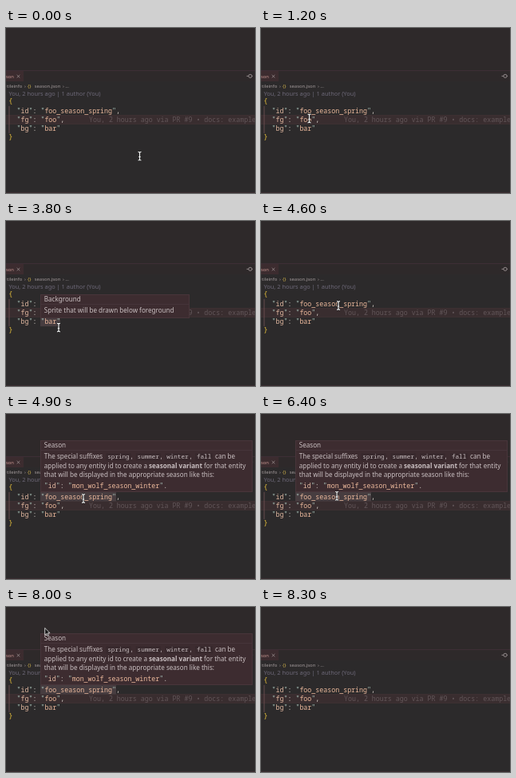
An HTML page for the animation above (9.1 s loop, 312x207 px).

```html
<!DOCTYPE html>
<html lang="en">
<head>
<meta charset="utf-8">
<title>Hover help in a JSON editor</title>
<style>
html, body { margin: 0; width: 100%; height: 100%; overflow: hidden; background: #2c2a2b; }
svg { display: block; width: 312px; height: 207px; }
text { font: 8.1px "Noto Sans", sans-serif; fill: #c9bfc1; white-space: pre; }
.small { font-size: 5.9px; fill: #a39a9b; }
.code { font: 500 8.3px "Noto Sans Mono", monospace; fill: #d3cbc5; }
.chip { font: 7.6px "Noto Sans Mono", monospace; }
.brace { fill: #ecc53c; font-size: 8.8px; }
.key { fill: #e2b8a0; }
.str { fill: #ecb99c; }
.quote { fill: #a9c2b8; }
.lens { fill: #6d6878; font-size: 7.4px; }
.blame { fill: #625659; font-weight: 400; }
.bold { font-weight: 700; }
.box { fill: #3d2c30; stroke: #48353a; }
.rule { stroke: #45343a; }
</style>
</head>
<body>
<svg viewBox="0 0 312 207">
  <rect width="312" height="207" fill="#2c2a2b"/>
  <rect width="312" height="67" fill="#2e292a"/>
  <rect y="54" width="22" height="13" fill="#3c2c2f"/>
  <path d="M0 53.5H312" stroke="#43303a" stroke-opacity=".8"/>
  <text class="small" x="10" y="63" text-anchor="end" style="fill:#c4938e">season.json</text>
  <path d="M13.7 58.8l3.6 3.6m0-3.6l-3.6 3.6" stroke="#a89c9e" stroke-width=".7"/>
  <g fill="none" stroke="#aaa0a1" stroke-width=".8">
    <circle cx="306" cy="60.3" r="2.1"/><path d="M301.5 60.3h2.4m4.2 0h1"/>
  </g>
  <text class="small" x="1" y="74.5">tileinfo</text>
  <text class="small" x="23" y="74.5">›</text>
  <text class="small" x="27" y="74.5" style="fill:#d9b84c">{}</text>
  <text class="small" x="35.7" y="74.5">season.json</text>
  <text class="small" x="71" y="74.5">› …</text>
  <text class="lens" x="3.5" y="84.8">You, 2 hours ago | 1 author (You)</text>
  <rect y="109" width="312" height="12" fill="#392d2f"/>
  <path d="M0 109.5H312M0 120.5H312" stroke="#403335" stroke-width=".6"/>
  <path d="M4 98V132" stroke="#745456" stroke-width=".8"/>
  <path d="M0 206.5H312" stroke="#3a2d30"/>
  <rect id="mark" x="43" height="11.5" fill="#473d40"/>
  <g id="lines"></g>
  <g id="popup"></g>
  <g id="beam" fill="none">
    <path id="stem" d="M-2-5.3Q0-5.3 0-4V4Q0 5.3-2 5.3M2-5.3Q0-5.3 0-4M0 4Q0 5.3 2 5.3M-1.2 1H1.2"
      stroke="#171717" stroke-width="2.4"/>
    <path d="M-2-5.3Q0-5.3 0-4V4Q0 5.3-2 5.3M2-5.3Q0-5.3 0-4M0 4Q0 5.3 2 5.3M-1.2 1H1.2"
      stroke="#f2f2f2" stroke-width="1.2"/>
  </g>
  <path id="arrow" d="M.4.4V9.2L2.5 7.4L3.9 10.6L5.4 9.9L4 6.8H6.8Z" fill="#161616" stroke="#f2f2f2" stroke-width=".8"/>
</svg>
<script>
const $ = id => document.getElementById(id);
const text = (cls, x, y, s) => `<text class="${cls}" x="${x}" y="${y}">${s}</text>`;
const span = (cls, s) => `<tspan class="${cls}">${s}</tspan>`;
const quoted = (cls, s) => span('quote', '"') + span(cls, s) + span('quote', '"');
const pair = (x, y, key, value, end) =>
  text('code', x, y, `${quoted('key', key)}: ${quoted('str', value)}${end}`);

$('lines').innerHTML =
  text('code brace', 3.3, 95, '{') +
  pair(13.5, 106.6, 'id', 'foo_season_spring', ',') +
  pair(13.5, 117.6, 'fg', 'foo', ',') +
  pair(13.5, 129, 'bg', 'bar', '') +
  text('code brace', 3.3, 139.8, '}') +
  text('code blame', 104, 117.6, 'You, 2 hours ago via PR #9 • docs: example');

const left = 47.8;
const frame = (y, w, h, title) =>
  `<rect class="box" x="43.5" y="${y + .5}" width="${w - 1}" height="${h - 1}"/>` +
  `<path class="rule" d="M44 ${y + 12.5}h${w - 2}"/>` + text('', left, y + 9, title);
const note = (y, w, title, body) => frame(y, w, 30, title) + text('', left, y + 23, body);
const chip = (x, s) =>
  `<rect x="${x - 2}" y="49" width="${s.length * 4.56 + 4}" height="9.5" rx="1.5" fill="#38292d"/>` +
  text('chip', x, 56.3, s);

const season = frame(33, 266, 65, 'Season') +
  text('', left, 56.4, 'The special suffixes') +
  chip(127.3, 'spring') + text('', 156.5, 56.4, ',') +
  chip(164.6, 'summer') + text('', 193.5, 56.4, ',') +
  chip(201.2, 'winter') + text('', 230.5, 56.4, ',') +
  chip(239, 'fall') + text('', 262, 56.4, 'can be') +
  text('', left, 67.8, `applied to any entity id to create a ${span('bold', 'seasonal variant')} for that entity`) +
  text('', left, 78.8, 'that will be displayed in the appropriate season like this:') +
  pair(left, 92.8, 'id', 'mon_wolf_season_winter', '.');

// Each hover: highlight start, popup start, end, highlight y and width, popup
const hovers = [
  [1600, 1700, 2300, 109.3, 25, note(79, 54, 'Foreground', 'Main sprite')],
  [2700, 2800, 3900, 120.7, 25, note(92, 187, 'Background', 'Sprite that will be drawn below foreground')],
  [4800, 4900, 8200, 98, 95, season]
];

// Pointer stops: time, x, y
const stops = [
  [0, 167.5, 160.7], [300, 167.5, 160.7], [900, 39, 118], [1100, 39, 118],
  [1200, 60.5, 113.5], [2100, 60.5, 113.5], [2400, 54, 122.5], [3600, 54, 122.5],
  [4100, 88, 154], [4600, 97, 106], [6300, 97, 106], [7000, 62, 48],
  [7300, 62, 48], [7400, 61.5, 47.6], [7800, 61.5, 47.6], [8300, 24, -14], [9100, 24, -14]
];

function pointer(t) {
  const i = stops.findIndex(s => s[0] > t);
  const [t0, x0, y0] = stops[i - 1], [t1, x1, y1] = stops[i];
  const u = (t - t0) / (t1 - t0), k = u * u * (3 - 2 * u);
  return [x0 + (x1 - x0) * k, y0 + (y1 - y0) * k];
}

const show = (el, on) => el.style.display = on ? '' : 'none';
let open = '';

function draw(now) {
  const t = Math.floor(now % 9100 / 100) * 100;
  const hover = hovers.find(h => t >= h[0] && t < h[2]);
  show($('mark'), hover);
  if (hover) {
    $('mark').setAttribute('y', hover[3]);
    $('mark').setAttribute('width', hover[4]);
  }
  const next = hover && t >= hover[1] ? hover[5] : '';
  if (next !== open) $('popup').innerHTML = open = next;

  const [x, y] = pointer(t), isArrow = t >= 6700;
  show($('beam'), !isArrow);
  show($('arrow'), isArrow);
  for (const id of ['beam', 'arrow']) $(id).setAttribute('transform', `translate(${x} ${y})`);
}

const start = performance.now();
function loop() {
  draw(performance.now() - start);
  requestAnimationFrame(loop);
}
loop();
</script>
</body>
</html>
```
